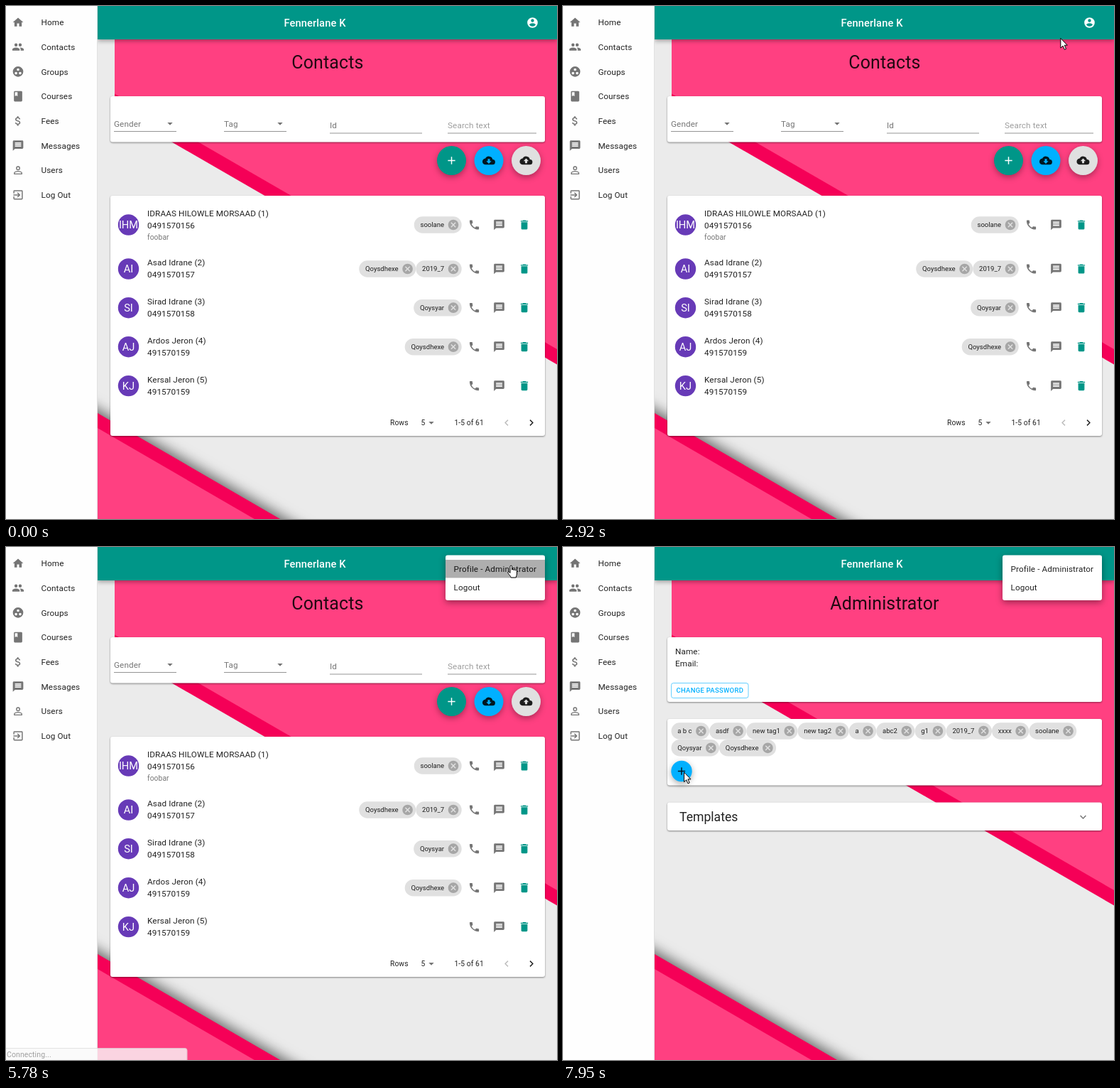
These frames come from a looping animation (776x722 px, 8 s). An HTML page:

```html
<!DOCTYPE html>
<html lang="en">
<head>
<meta charset="utf-8">
<title>Contacts</title>
<style>
  html, body { margin: 0; width: 100%; height: 100%; overflow: hidden; background: #ebebeb; }
  svg { display: block; width: 100vw; height: 100vh; font-family: Roboto, sans-serif; }
  path { fill-rule: evenodd; }
  .card { fill: #fff; filter: drop-shadow(0 1px 1px rgba(0,0,0,.45)); }
  .bar { filter: drop-shadow(0 2px 3px rgba(0,0,0,.35)); }
  .fab { filter: drop-shadow(0 3px 4px rgba(0,0,0,.33)); }
  .paper { fill: #fff; filter: drop-shadow(0 3px 5px rgba(0,0,0,.4)); }
  .corner { filter: drop-shadow(3px -4px 9px rgba(0,0,0,.55)); }
</style>
</head>
<body>
<svg id="stage" viewBox="0 0 776 722"></svg>
<script>
const TEAL = '#009688', BLUE = '#00b0ff', INK = 'rgba(0,0,0,.87)', GREY = '#757575', ROW_ICON = 17.6;

const disc = (x, y, r) => `M${x - r} ${y}a${r} ${r} 0 1 0 ${2 * r} 0a${r} ${r} 0 1 0 ${-2 * r} 0z`;
const cloud = 'M19.35 10A7.5 7.5 0 0 0 5.35 8A6 6 0 0 0 6 20h13a5 5 0 0 0 .35-10z';

// Icons on a 24 unit grid
const icons = {
  home: 'M10 20v-6h4v6h5v-8h3L12 3 2 12h3v8z',
  people: disc(16, 8, 3) + disc(8, 8, 3) + 'M8 13c-2.3 0-7 1.2-7 3.5V19h14v-2.5C15 14.2 10.3 13 8 13z' +
    'M16 13l-1 .05c1.2.85 2 2 2 3.45V19h6v-2.5C23 14.2 18.3 13 16 13z',
  group: disc(12, 12, 10) + disc(8, 15, 2.5) + disc(12, 8, 2.5) + disc(16, 15, 2.5),
  book: 'M6 2h12a2 2 0 0 1 2 2v16a2 2 0 0 1-2 2H6a2 2 0 0 1-2-2V4a2 2 0 0 1 2-2zM6 4v8l2.5-1.5L11 12V4z',
  money: 'M11.8 10.9c-2.27-.59-3-1.2-3-2.15 0-1.09 1-1.85 2.7-1.85 1.78 0 2.44.85 2.5 2.1h2.2c-.07-1.72-1.1-3.3-3.2-3.8V3h-3v2.16' +
    'c-1.94.42-3.5 1.68-3.5 3.6 0 2.3 1.9 3.46 4.7 4.13 2.5.6 3 1.48 3 2.4 0 .7-.5 1.8-2.7 1.8-2.06 0-2.87-.92-2.98-2.1h-2.2' +
    'c.12 2.2 1.76 3.42 3.68 3.83V21h3v-2.15c1.95-.37 3.5-1.5 3.5-3.55 0-2.84-2.43-3.8-4.7-4.4z',
  message: 'M20 2H4a2 2 0 0 0-2 2v18l4-4h14a2 2 0 0 0 2-2V4a2 2 0 0 0-2-2zM18 14H6v-2h12zM18 11H6V9h12zM18 8H6V6h12z',
  person: disc(12, 8, 4) + disc(12, 8, 2.1) +
    'M12 13c-2.7 0-8 1.3-8 4v3h16v-3c0-2.7-5.3-4-8-4zM12 14.9c3 0 6.1 1.5 6.1 2.1v1.1H5.9V17c0-.6 3.1-2.1 6.1-2.1z',
  exit: 'M10.1 15.6L11.5 17l5-5-5-5-1.4 1.4 2.6 2.6H3v2h9.7zM19 3H5a2 2 0 0 0-2 2v4h2V5h14v14H5v-4H3v4a2 2 0 0 0 2 2h14a2 2 0 0 0 2-2V5a2 2 0 0 0-2-2z',
  account: disc(12, 12, 10) + disc(12, 8, 3) + 'M12 19.2a7.2 7.2 0 0 1-6-3.2c0-2 4-3.1 6-3.1s6 1.1 6 3.1a7.2 7.2 0 0 1-6 3.2z',
  phone: 'M6.6 10.8a15 15 0 0 0 6.6 6.6l2.2-2.2a1 1 0 0 1 1-.25c1.1.37 2.3.57 3.6.57a1 1 0 0 1 1 1V20a1 1 0 0 1-1 1A17 17 0 0 1 3 4a1 1 0 0 1 1-1h3.5' +
    'a1 1 0 0 1 1 1c0 1.25.2 2.45.57 3.57a1 1 0 0 1-.25 1z',
  trash: 'M6 19a2 2 0 0 0 2 2h8a2 2 0 0 0 2-2V7H6zM19 4h-3.5l-1-1h-5l-1 1H5v2h14z',
  add: 'M19 13h-6v6h-2v-6H5v-2h6V5h2v6h6z',
  download: cloud + 'M17 13l-5 5-5-5h3V9h4v4z',
  upload: cloud + 'M14 13v4h-4v-4H7l5-5 5 5z',
  cancel: disc(12, 12, 10) + 'M17 15.6L15.6 17 12 13.4 8.4 17 7 15.6l3.6-3.6L7 8.4 8.4 7l3.6 3.6L15.6 7 17 8.4 13.4 12z',
  drop: 'M7 10l5 5 5-5z',
  left: 'M15.4 7.4L14 6l-6 6 6 6 1.4-1.4-4.6-4.6z',
  right: 'M10 6L8.6 7.4l4.6 4.6-4.6 4.6L10 18l6-6z',
  expand: 'M16.6 8.6L12 13.2 7.4 8.6 6 10l6 6 6-6z'
};

const icon = (name, x, y, fill = GREY, size = ROW_ICON) =>
  `<path d="${icons[name]}" fill="${fill}" transform="translate(${x} ${y}) scale(${size / 24}) translate(-12 -12)"/>`;
// y is the middle of the capitals
const text = (str, x, y, { size = 11.73, fill = INK, anchor = 'start', weight = 400, track = .0094 } = {}) =>
  `<text x="${x}" y="${y + size * .355}" font-size="${size}" fill="${fill}" text-anchor="${anchor}" font-weight="${weight}" letter-spacing="${track * size}">${str}</text>`;
const rect = (x, y, x2, y2, attrs) => `<rect x="${x}" y="${y}" width="${x2 - x}" height="${y2 - y}" ${attrs}/>`;
const card = (y, y2) => rect(147, y, 759, y2, 'rx="3" class="card"');
const fab = (name, x, y, r, fill, ink) => `<circle cx="${x}" cy="${y}" r="${r}" fill="${fill}" class="fab"/>` + icon(name, x, y, ink);
const heading = str => text(str, 453, 79, { size: 24.9, anchor: 'middle', track: .0074 });
const underline = (x, x2, y) => rect(x, y, x2, y + 1, 'fill="rgba(0,0,0,.42)"');

const pen = document.createElement('canvas').getContext('2d');
pen.font = '9.53px Roboto, sans-serif';
const chipWidth = label => pen.measureText(label).width + 33.4;
function chips(labels, x, y) {
  return labels.map(label => {
    const w = chipWidth(label);
    const out = rect(x, y - 11.75, x + w, y + 11.75, 'rx="11.75" fill="#e0e0e0"') +
      text(label, x + 8.8, y, { size: 9.53, track: 0 }) + icon('cancel', x + w - 11.7, y, '#a6a6a6');
    x += w;
    return out;
  }).join('');
}

function contact([y, initials, name, phone, tags, note]) {
  const top = note ? y - 16 : y - 9;
  const width = tags.reduce((sum, tag) => sum + chipWidth(tag), 0);
  return `<circle cx="172.5" cy="${y}" r="14.7" fill="#673ab7"/>` +
    text(initials, 172.5, y, { size: 14.67, fill: '#fff', anchor: 'middle', track: 0 }) +
    text(name, 199, top) + text(phone, 199, top + 17.2) +
    (note ? text(note, 199, y + 17, { size: 10.27, fill: 'rgba(0,0,0,.54)' }) : '') +
    chips(tags, 641.7 - width, y) +
    icon('phone', 659.5, y) + icon('message', 694.5, y) + icon('trash', 730, y, TEAL);
}

const small = { size: 10.27 }, label = { fill: 'rgba(0,0,0,.54)' };

const backdrop = `<rect width="776" height="722" fill="#ebebeb"/>
  <path d="M153 40V145L776 504.5V40z" fill="#f50057"/><path d="M153 40V123.5L776 483V40z" fill="#ff4081"/>
  <path d="M60 533L500 788H60z" fill="#f50057" class="corner"/><path d="M60 554L500 809H60z" fill="#ff4081"/>`;

const header = rect(129, 0, 776, 47, `fill="${TEAL}" class="bar"`) +
  text('Fennerlane K', 435, 23.5, { size: 14.67, fill: '#fff', weight: 500, anchor: 'middle', track: .0075 }) +
  icon('account', 741.5, 23.5, '#fff') + '<circle id="tap" cx="741.5" cy="23.5" fill="#fff"/>';

const sidebar = rect(0, 0, 128, 722, 'fill="#fefefe"') + rect(128, 0, 129, 722, 'fill="#e0e0e0"') +
  [['home', 'Home'], ['people', 'Contacts'], ['group', 'Groups'], ['book', 'Courses'],
   ['money', 'Fees'], ['message', 'Messages'], ['person', 'Users'], ['exit', 'Log Out']]
    .map(([name, str], i) => icon(name, 17, 23 + 34.7 * i) + text(str, 49.5, 23 + 34.7 * i)).join('');

const contactsPage = heading('Contacts') + card(127, 191.5) +
  text('Gender', 152, 166, label) + icon('drop', 231, 165.5) + underline(152, 240, 176) +
  '<rect id="focusLine" x="152" y="175.5" width="88" height="1.5" fill="rgba(0,0,0,.87)"/>' +
  text('Tag', 307, 166, label) + icon('drop', 386, 165.5) + underline(307, 395, 176) +
  text('Id', 456, 168, label) + underline(456, 586, 178.5) +
  text('Search text', 622, 168, { fill: 'rgba(0,0,0,.38)' }) + underline(622, 747, 178.5) +
  fab('add', 627.5, 217.5, 20.5, TEAL, '#fff') + fab('download', 680, 217.5, 20.5, BLUE, INK) +
  fab('upload', 732.5, 217.5, 20.5, '#e0e0e0', INK) + card(267, 605) +
  [[308, 'IHM', 'IDRAAS HILOWLE MORSAAD (1)', '0491570156', ['soolane'], 'foobar'],
   [370, 'AI', 'Asad Idrane (2)', '0491570157', ['Qoysdhexe', '2019_7']],
   [424.7, 'SI', 'Sirad Idrane (3)', '0491570158', ['Qoysyar']],
   [479.7, 'AJ', 'Ardos Jeron (4)', '491570159', ['Qoysdhexe']],
   [534.6, 'KJ', 'Kersal Jeron (5)', '491570159', []]].map(contact).join('') +
  text('Rows', 541, 586.5, small) + text('5', 584.5, 586.5, small) + icon('drop', 599, 586.5) +
  text('1-5 of 61', 631.5, 586.5, small) + icon('left', 705, 586.5, 'rgba(0,0,0,.26)') + icon('right', 740, 586.5, INK);

const adminPage = heading('Administrator') + card(127, 218) + text('Name:', 158, 147) + text('Email:', 158, 164) +
  rect(152.5, 191.5, 261, 212.5, `rx="3" fill="none" stroke="${BLUE}" stroke-opacity=".6"`) +
  text('CHANGE PASSWORD', 159.5, 201.5, { size: 9.53, fill: BLUE, weight: 500, track: .0286 }) + card(242, 335.5) +
  chips(['a b c', 'asdf', 'new tag1', 'new tag2', 'a', 'abc2', 'g1', '2019_7', 'xxxx', 'soolane'], 152.5, 259) +
  chips(['Qoysyar', 'Qoysdhexe'], 152.5, 282.8) + fab('add', 167, 315.5, 14.7, BLUE, INK) +
  card(359.5, 399) + text('Templates', 164, 380, { size: 17.6, track: 0 }) + icon('expand', 732.5, 380);

const menu = rect(619, 11.5, 759, 75, 'rx="3" class="paper"') +
  '<clipPath id="item"><rect x="619" y="18" width="140" height="25.5"/></clipPath><g clip-path="url(#item)">' +
  rect(619, 18, 759, 43.5, 'id="hover"') + '<circle id="ripple" cx="712" cy="28"/></g>' +
  text('Profile - Administrator', 630.5, 30.5) + text('Logout', 630.5, 56.5);

const status = rect(-3, 705.5, 255, 725, 'rx="3" fill="#fafafa" stroke="#ddd"') + text('Connecting...', 1, 714, { size: 10.5, fill: '#888' });

const ids = { contacts: contactsPage, admin: adminPage, menu, status,
  arrow: '<path d="M.5 .5V14.2l3.2-3 2.3 5.2 2.2-1-2.3-5.1H10z" fill="#fff" stroke="#000"/>',
  hand: '<path d="M4 2a1.3 1.3 0 0 1 2.6 0v4.7a1.2 1.2 0 0 1 2.3.3a1.2 1.2 0 0 1 2.3.5a1.2 1.2 0 0 1 2.3.8v4.2c0 2-1.3 3-1.3 5h-7c-.4-2-2.8-4-4.2-6.3c-.9-1.5.6-2.4 1.7-1.4L4 11z" fill="#fff" stroke="#000"/>' };
const group = id => `<g id="${id}">${ids[id]}</g>`;
document.getElementById('stage').innerHTML = backdrop + group('contacts') + group('admin') + header + sidebar +
  ['menu', 'status', 'arrow', 'hand'].map(group).join('');

const el = id => document.getElementById(id);
const set = (id, attrs) => { for (const key in attrs) el(id).setAttribute(key, attrs[key]); };
const show = (id, on) => set(id, { display: on ? 'inline' : 'none' });
const ramp = (t, from, to) => Math.min(1, Math.max(0, (t - from) / (to - from)));
const pulse = (t, a, b, c, d) => ramp(t, a, b) * (1 - ramp(t, c, d));

// Pointer path: time, x, y
const path = [[1150, 16, 159], [1430, 205, 177], [1700, 205, 177], [1910, 445, 121], [1980, 513, 128], [2150, 513, 128],
  [2920, 700, 45], [3000, 727, 39], [3040, 727, 39], [3310, 736, 17], [3600, 736, 17], [3610, 742, 19], [4050, 742, 19],
  [4130, 742, 27.5], [4790, 742, 27.5], [5030, 706, 25.5], [6629, 706, 25.5], [6630, 596.5, 71], [6850, 322, 211],
  [7340, 322, 211], [7780, 190, 328], [7950, 170, 316.5], [8000, 170, 316.5]];
function pointer(t) {
  const i = path.findIndex(p => p[0] > t);
  const [t0, x0, y0] = path[i - 1], [t1, x1, y1] = path[i], k = ramp(t, t0, t1);
  return [x0 + (x1 - x0) * k, y0 + (y1 - y0) * k];
}

function draw() {
  const t = performance.now() % 8000;
  show('contacts', t < 5850);
  show('admin', t >= 5850);
  show('status', t >= 5710 && t < 5850);
  set('status', { opacity: .8 });

  const open = ramp(t, 3990, 4290), grow = 1 - (1 - open) ** 3;
  set('menu', { opacity: open,
    transform: `translate(742 23) scale(${.75 + .25 * grow} ${.5625 + .4375 * grow}) translate(-742 -23)` });
  set('tap', { r: 20 * ramp(t, 3820, 4050), opacity: .25 * pulse(t, 3800, 3830, 4050, 4400) });
  set('focusLine', { opacity: pulse(t, 1300, 1430, 1740, 1900) });
  set('hover', { opacity: .08 * pulse(t, 4290, 4450, 6640, 6840) });
  set('ripple', { r: 130 * ramp(t, 5330, 5700), opacity: .26 * pulse(t, 5320, 5420, 5790, 5930) });

  const hand = t >= 3160 && t < 6630;
  show('arrow', t >= 1150 && !hand);
  show('hand', hand);
  if (t >= 1150) set(hand ? 'hand' : 'arrow', { transform: `translate(${pointer(t)})` });
  requestAnimationFrame(draw);
}
draw();
</script>
</body>
</html>
```
